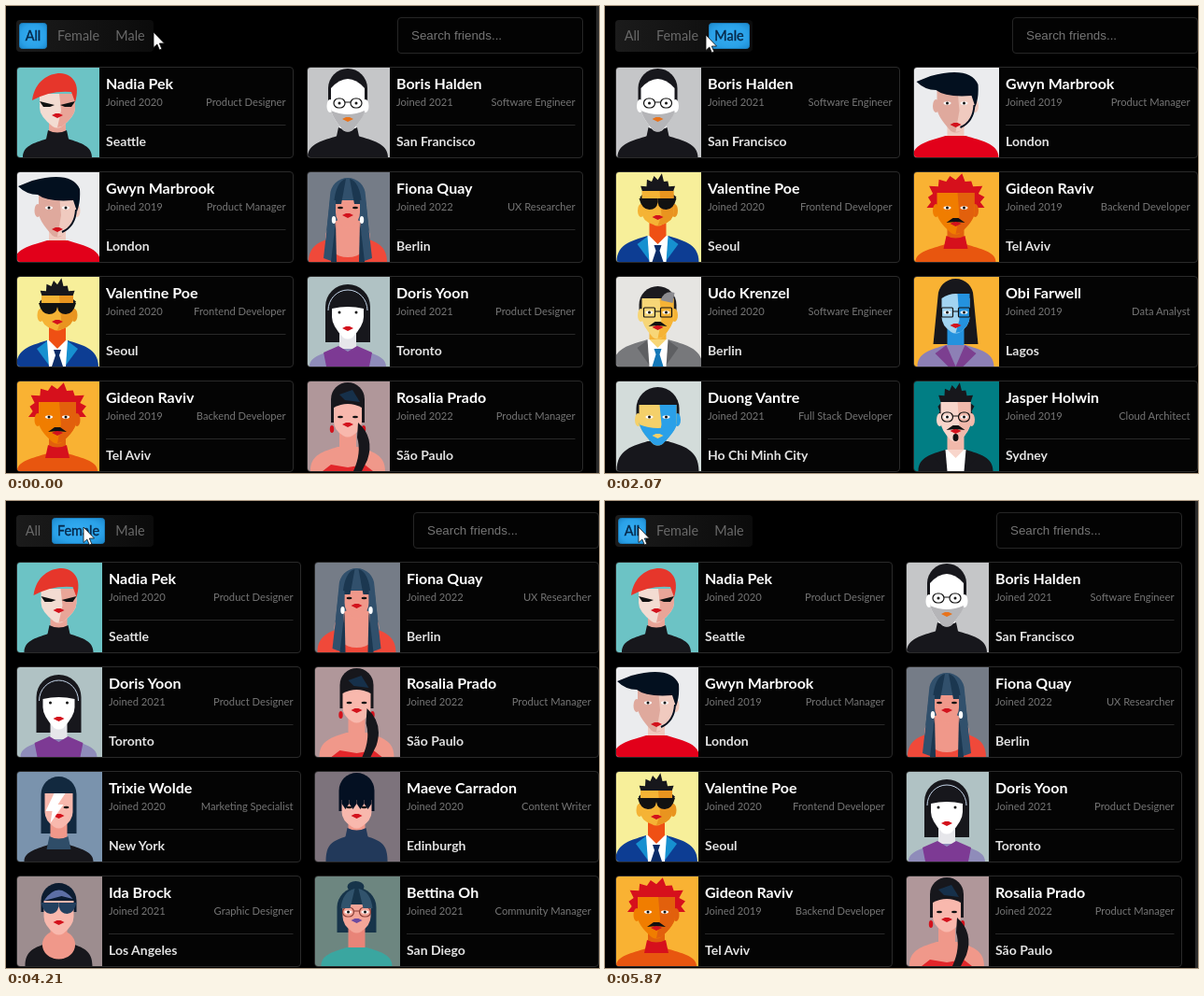
These frames come from a looping animation (635x500 px, 7100 ms). An HTML page:

```html
<!DOCTYPE html>
<html lang="en">
<head>
<meta charset="utf-8">
<title>Friends</title>
<style>
html, body { margin: 0; width: 100%; height: 100%; overflow: hidden; background: #000; }
svg { display: block; }
text { font-family: Lato, sans-serif; fill: #757575; font-size: 11.2px; }
.name { font-size: 16px; font-weight: 700; fill: #fff; }
.city { font-size: 14px; font-weight: 700; fill: #e2e2e2; }
.hint { font: 13.33px "Liberation Sans", Arial, sans-serif; }
.end { text-anchor: end; }
.tab text { font-size: 14.4px; text-anchor: middle; fill: #696969; }
.tab rect { fill: none; }
.hot text { fill: #fff; }
.hot rect { fill: #0c0c0c; }
.on rect { fill: url(#blue); stroke: #1b7fbe; }
.on text { fill: #06284a; stroke: #06284a; stroke-width: .4px; }
</style>
</head>
<body>
<script>
const ink = '#17171c', navy = '#0d2238', red = '#d3121c', pink = '#f8b8ad', rose = '#f0988a';

// name, joined, role, city, group, look
const people = [
  ['Nadia Pek', 2020, 'Product Designer', 'Seattle', 'Female', { bg: '#6cc3c5', skin: '#f3dcd2', shade: '#e9a598', w: 19, top: 28, chin: 63,
    eyes: 'slant', coat: ink, shoulder: 76, broad: 37, collar: ink,
    front: fill('#e6362b', 'M20 35C23 14 38 6 50 6C64 7 72 18 66 37L62 26Q40 24 20 35Z') }],
  ['Boris Halden', 2021, 'Software Engineer', 'San Francisco', 'Male', { bg: '#c5c6c8', skin: '#fff', w: 18, top: 12, arc: 10, chin: 67,
    hair: ink, crown: 1, stubble: '#b5b5b8', eyes: 'specs', lips: '#e8731c', coat: ink, collar: ink, broad: 43 }],
  ['Gwyn Marbrook', 2019, 'Product Manager', 'London', 'Male', { bg: '#ebecee', skin: '#dfa99d', shade: '#f0cabf', w: 20, top: 24, chin: 68,
    eyes: 'open', mouth: 61, coat: '#e2001a', broad: 46,
    front: fill('#03101f', 'M5 15L20 9Q62 -2 71 18Q72 32 68 42L64 30Q36 32 26 24Q14 24 5 15Z') + line('#03101f', 'M67 40Q66 58 52 64', 2) }],
  ['Fiona Quay', 2022, 'UX Researcher', 'Berlin', 'Female', { bg: '#757c87', skin: rose, w: 13, top: 30, chin: 58,
    hair: '#31506c', r: 19, crown: 6, end: 96, flare: 7, eyes: 'shut', coat: '#f0493a', broad: 42, shoulder: 68, neckline: 30,
    strands: '#1b3750', drops: '#fff' }],
  ['Valentine Poe', 2020, 'Frontend Developer', 'Seoul', 'Male', { bg: '#f7ef9a', skin: '#f5b335', shade: '#e9941f', throat: '#ef5014', w: 17, top: 20, chin: 56,
    spikes: 20, eyes: 'shades', mouth: 48, coat: '#0d3d93', broad: 44, shoulder: 68, lapel: '#1690d0', tie: '#0b2c68' }],
  ['Doris Yoon', 2021, 'Product Designer', 'Toronto', 'Female', { bg: '#b0c2c4', skin: '#fff', throat: '#e6e6ea', w: 17, top: 32, arc: 2, chin: 65,
    hair: ink, r: 24, crown: 8, end: 70, eyes: 'open', mouth: 55, coat: '#8f8cba', broad: 41, shoulder: 77, bib: '#7d3a94', band: '#c4d4e8' }],
  ['Gideon Raviv', 2019, 'Backend Developer', 'Tel Aviv', 'Male', { bg: '#f9b233', skin: '#f07d00', shade: '#e2600c', w: 20, top: 22, chin: 65,
    hair: '#d6101c', spikes: 31, eyes: 'open', mouth: 55, whiskers: 1, coat: '#e8560f', broad: 43, shoulder: 77, collar: '#d6101c' }],
  ['Rosalia Prado', 2022, 'Product Manager', 'São Paulo', 'Female', { bg: '#b0979a', skin: pink, throat: rose, w: 15, top: 24, arc: 4, chin: 58,
    hair: ink, crown: 1, end: 44, eyes: 'shut', coat: rose, broad: 40, shoulder: 70, drops: red, dress: '#e2262a',
    front: fill(ink, 'M58 44Q76 60 68 84L62 96H53Q62 76 57 60Z') + fill('#16304a', 'M38 14L52 9L60 22L44 20Z') }],
  ['Udo Krenzel', 2020, 'Software Engineer', 'Berlin', 'Male', { bg: '#e6e5e2', skin: '#f7d677', shade: '#f5b335', w: 17, top: 23, chin: 65,
    hair: '#1b1b1f', crown: 10, eyes: 'specs', square: 1, mouth: 54, whiskers: 1, coat: '#77787b', broad: 48, shoulder: 67, lapel: '#5e5f62', tie: '#1478b8',
    front: fill('#8c8c90', 'M50 25Q54 14 65 17L63 28Z') }],
  ['Obi Farwell', 2019, 'Data Analyst', 'Lagos', 'Male', { bg: '#f9b233', skin: '#a2d4f1', shade: '#2492de', w: 15, top: 18, arc: 5, chin: 59,
    hair: ink, r: 19, crown: 2, end: 72, flare: 5, eyes: 'specs', square: 1, mouth: 52, coat: '#8d80b5', broad: 41, lapel: '#7c3f90' }],
  ['Duong Vantre', 2021, 'Full Stack Developer', 'Ho Chi Minh City', 'Male', { bg: '#d3dcda', skin: '#f4d06a', shade: '#2aa0e8', throat: '#1d86d0', w: 20, top: 25, chin: 67,
    hair: ink, r: 23, crown: 6, eyes: 'open', lips: '#f4d06a', stubble: '#2aa0e8', mouth: 58, coat: ink, broad: 44, shoulder: 64 }],
  ['Jasper Holwin', 2019, 'Cloud Architect', 'Sydney', 'Male', { bg: '#017e84', skin: '#f8d5cb', shade: '#f1b9ab', w: 16, top: 22, chin: 63,
    spikes: 20, eyes: 'specs', mouth: 53, whiskers: 1, goatee: 1, coat: ink, broad: 40, lapel: ink, tie: '#fff' }],
  ['Trixie Wolde', 2020, 'Marketing Specialist', 'New York', 'Female', { bg: '#7a93ad', skin: pink, throat: rose, w: 15, top: 23, chin: 59,
    hair: '#12293f', r: 19, crown: 5, end: 66, eyes: 'shut', coat: ink, broad: 37, shoulder: 78, collar: '#2f4d68',
    front: fill('#fff', 'M42 23H54L46 35H52L38 55L40 42H33Z') }],
  ['Maeve Carradon', 2020, 'Content Writer', 'Edinburgh', 'Female', { bg: '#7d737c', skin: pink, throat: rose, w: 16, top: 30, chin: 59,
    hair: '#041022', crown: 1, end: 42, eyes: 'shut', coat: '#22395a', broad: 33, shoulder: 69, collar: '#22395a', fringe: 38 }],
  ['Ida Brock', 2021, 'Graphic Designer', 'Los Angeles', 'Female', { bg: '#9d8d8f', skin: pink, throat: rose, w: 16, top: 26, chin: 61,
    hair: '#0b1c30', crown: 7, eyes: 'shades', lens: '#23405f', coat: ink, broad: 36, shoulder: 71, neckline: 22,
    front: fill('#5c6fa5', 'M31 26Q46 4 62 24L50 21Z') }],
  ['Bettina Oh', 2021, 'Community Manager', 'San Diego', 'Female', { bg: '#6d8680', skin: '#f3a598', throat: '#e88478', w: 15, top: 30, chin: 59,
    hair: '#17344a', r: 21, crown: 12, end: 60, bun: 1, eyes: 'specs', frame: '#8d4038', lips: '#6b4aa0', coat: '#3aa6a0', broad: 38, shoulder: 76, strands: '#31536c' }]
];

const C = 47; // centre line of every portrait
function fill(color, d) { return `<path d="${d}" fill="${color}"/>`; }
function line(color, d, width = 1.2) { return `<path d="${d}" fill="none" stroke="${color}" stroke-width="${width}"/>`; }
function oval(color, x, y, rx, ry = rx) { return `<ellipse cx="${x}" cy="${y}" rx="${rx}" ry="${ry}" fill="${color}"/>`; }
function pair(part) { return part(-1) + part(1); }

function arch(color, r, crown, end, flare = 0) {
  return fill(color, `M${C - r - flare} ${end}L${C - r} ${crown + r}A${r} ${r} 0 0 1 ${C + r} ${crown + r}L${C + r + flare} ${end}Z`);
}

function spikes(color, rx) {
  let d = `M${C - rx} 38`;
  for (let i = 0; i <= 16; i++) {
    const a = Math.PI * (1 + i / 16), k = i % 2 ? 1.05 + .08 * Math.sin(i * 5) : .85;
    d += `L${C + rx * k * Math.cos(a)} ${32 + 28 * k * Math.sin(a)}`;
  }
  return fill(color, d + `L${C + rx} 38Z`);
}

function head({ skin, shade, w, top, arc = 0, chin, stubble }) {
  const jaw = s => `Q${C + s * w} 52 ${C + s * 5} ${chin}`;
  const chinCurve = `Q${C} ${chin + 3} ${C - 5} ${chin}Q${C - w} 52 ${C - w} 43`;
  let out = fill(skin, `M${C - w} ${top + arc}Q${C} ${top - arc} ${C + w} ${top + arc}V43${jaw(1)}${chinCurve}Z`);
  if (shade) out += fill(shade, `M${C + 2} ${top}H${C + w}V43${jaw(1)}L${C} ${chin + 1}L${C + 4} 46Z`);
  if (stubble) out += fill(stubble, `M${C - w} 46Q${C} 54 ${C + w} 46${jaw(1)}${chinCurve}Z`);
  return out;
}

function eyes({ eyes: kind, w, square, frame = '#111', lens = '#111' }) {
  if (kind === 'slant') return pair(s => fill('#111', `M${C + s * 3} 40L${C + s * 19} 36L${C + s * 15} 42H${C + s * 8}Z`));
  if (kind === 'shut') return pair(s => oval('#111', C + s * 8, 38, 3, 1.2));
  if (kind === 'shades') return pair(s => fill(lens, `M${C} 28H${C + s * (w + 3)}Q${C + s * w} 40 ${C + s * 9} 40T${C} 32Z`));
  let out = pair(s => oval('#fff', C + s * 9, 38, 4, 1.8) + oval('#111', C + s * 9, 38, 1.5));
  if (kind === 'specs') out += pair(s => `<rect x="${C + s * 9 - 6}" y="33" width="12" height="10" rx="${square ? 1 : 5}" fill="none" stroke="${frame}" stroke-width="1.2"/>`)
    + line(frame, `M${C - 3} 37h6`);
  return out;
}

function mouth({ lips = red, chin, mouth: y = chin - 12, whiskers, goatee }) {
  let out = fill(lips, `M${C - 6} ${y}L${C - 2} ${y - 2}H${C + 2}L${C + 6} ${y}L${C} ${y + 3}Z`);
  if (whiskers) out += fill('#111', `M${C - 10} ${y - 1}L${C - 3} ${y - 6}H${C + 3}L${C + 10} ${y - 1}L${C} ${y - 2}Z`);
  if (goatee) out += oval('#111', C, y + 7, 3, 4);
  return out;
}

function body({ coat, broad, shoulder: y = 73, collar, lapel, tie, bib, dress, neckline, skin, throat = skin }) {
  const side = (s, x) => `C${C + s * broad} ${y + 8} ${C + s * 26} ${y + 5} ${x} ${y}`;
  let out = fill(coat, `M${C - broad} 96${side(-1, C - 11)}H${C + 11}C${C + 26} ${y + 5} ${C + broad} ${y + 8} ${C + broad} 96Z`);
  if (lapel) out += pair(s => fill(lapel, `M${C + s * 10} ${y}L${C + s * 22} ${y + 9}L${C + s * 8} 96H${C}Z`));
  if (tie) out += fill('#fff', `M${C - 11} ${y}H${C + 11}L${C + 9} 96H${C - 9}Z`) + fill(throat, `M${C - 9} ${y}h18l-9 9z`)
    + fill(tie, `M${C - 4} ${y + 10}h8l-2 6l4 ${80 - y}h-12l4 ${y - 80}z`);
  if (bib) out += fill(bib, `M${C - 23} 96L${C - 26} ${y + 4}L${C - 10} ${y - 3}L${C} ${y + 3}L${C + 10} ${y - 3}L${C + 26} ${y + 4}L${C + 23} 96Z`);
  if (dress) out += fill(dress, `M${C - 27} 96L${C - 18} 89L${C} 92L${C + 18} 89L${C + 27} 96Z`);
  if (neckline) out += oval(throat, C, y + 2, neckline * .8, neckline * .7);
  if (collar) out += fill(collar, `M${C - 10} ${y - 9}Q${C} ${y - 4} ${C + 10} ${y - 9}L${C + 13} ${y + 5}H${C - 13}Z`);
  return out;
}

function portrait(look, group) {
  const { bg, skin, shade = skin, throat = shade, hair = ink, w, top, crown, r = w + 3, end = 38, flare, chin } = look;
  const { bun, strands, band, drops, fringe, front = '' } = look;
  let out = `<rect width="96" height="96" fill="${bg}"/>`;
  if (bun) out += oval(hair, C - 1, 11, 9, 6);
  if (crown) out += arch(hair, r, crown, end, flare);
  if (look.spikes) out += spikes(hair, look.spikes);
  out += fill(throat, `M${C - 9} 48h18v34h-18z`) + body(look);
  if (group === 'Male' && end < 40) out += pair(s => oval(s < 0 ? skin : shade, C + s * (w + 1), 41, 3.5, 7));
  out += head(look) + eyes(look) + mouth(look);
  if (strands) out += pair(s => fill(strands, `M${C + s * 2} ${crown + 1}Q${C + s * w} ${crown + 4} ${C + s * (w + 2)} 34H${C + s * 7}Z`));
  if (strands && end > 90) out += pair(s => fill(hair, `M${C + s * w} 30H${C + s * r}L${C + s * 26} 92L${C + s * 15} 96Z`) + fill(strands, `M${C + s * w} 52L${C + s * 18} 96H${C + s * 12}Z`));
  if (band) out += line(band, `M${C - 21} 36A21 22 0 0 1 ${C + 21} 36`, 1);
  if (drops) out += pair(s => oval(drops, C + s * (w + 2), 51, 2.2, 4));
  if (fringe) for (let x = C - w; x < C + w; x += 8) out += fill(hair, `M${x} 29h8v5l-4 ${fringe - 32}l-4 -6z`);
  return out + front;
}

const tabs = [['All', 14, 30], ['Female', 49, 57], ['Male', 111, 44]];
const loop = 7100;
// start, end, from x, to x, dip
const moves = [[280, 740, 158, 138, 4], [1830, 2630, 138, 85, 4], [4190, 4830, 85, 57, 1], [4930, 5510, 57, 36, 5]];

function card([name, year, role, city, group, look], x, y, w, pic) {
  const left = pic + 8, right = w - 8.5;
  return `<g transform="translate(${x} ${y})">
    <rect x=".5" y=".5" width="${w - 1}" height="97" rx="3.5" fill="#040404" stroke="#2a2a2a"/>
    <g clip-path="url(#round)"><svg x="1" y="1" width="${pic}" height="96" viewBox="0 0 96 96" preserveAspectRatio="xMidYMid slice">${portrait(look, group)}</svg></g>
    <text class="name" x="${left}" y="24">${name}</text>
    <text x="${left}" y="42">Joined ${year}</text>
    <text class="end" x="${right}" y="42">${role}</text>
    <path d="M${left} 62.5H${right}" stroke="#292929"/>
    <text class="city" x="${left}" y="85">${city}</text></g>`;
}

function view(group) {
  const all = group === 'All';
  const [x2, right, pic] = all ? [322, 618, 88] : [330, 635, 91];
  const shown = people.filter(p => all || p[4] === group).slice(0, 8);
  const cards = shown.map((p, i) => card(p, i % 2 ? x2 : 11, 65 + 112 * (i >> 1), i % 2 ? right - x2 : x2 - 25, pic));
  return `<g class="view">
    <rect x="${right - 198.5}" y="12.5" width="198" height="38" rx="3.5" fill="#030303" stroke="#262626"/>
    <text class="hint" x="${right - 184}" y="36">Search friends...</text>
    ${all ? '<path d="M632 0h3v500h-3z" fill="#2b2b2b"/>' : ''}${cards.join('')}</g>`;
}

document.body.innerHTML = `<svg width="635" height="500">
  <defs>
    <clipPath id="round"><rect x="1" y="1" width="120" height="96" rx="3"/></clipPath>
    <linearGradient id="bar"><stop stop-color="#1b1b1b"/><stop offset="1" stop-color="#0b0b0b"/></linearGradient>
    <radialGradient id="blue" r=".75"><stop stop-color="#35aef4"/><stop offset=".6" stop-color="#2aa1e8"/><stop offset="1" stop-color="#1a84c8"/></radialGradient>
  </defs>
  ${tabs.map(t => view(t[0])).join('')}
  <rect x="11" y="15" width="147" height="34" rx="4" fill="url(#bar)"/>
  ${tabs.map(([label, x, w]) => `<g class="tab"><rect x="${x + .5}" y="18.5" width="${w - 1}" height="27" rx="3"/>
    <text x="${x + w / 2}" y="37">${label}</text></g>`).join('')}
  <path id="arrow" d="M0 0V16.5L3.8 13 6.4 19 8.8 18 6.3 12H11.5Z" fill="#fff" stroke="#111" stroke-width=".8"/>
</svg>`;

const views = document.querySelectorAll('.view');
const buttons = document.querySelectorAll('.tab');
const arrow = document.getElementById('arrow');

function pointer(t) {
  const [start, end, from, to, dip] = moves.findLast(m => t >= m[0]) || moves[0];
  const k = Math.min(1, Math.max(0, (t - start) / (end - start)));
  const eased = 1 - (1 - k) ** 2.3;
  return [from + (to - from) * eased, 28 + dip * Math.sin(Math.PI * k)].map(Math.round);
}

function draw(now) {
  const t = now % loop;
  const active = t < 1240 || t >= 5870 ? 0 : t < 3250 ? 2 : 1;
  const [x, y] = pointer(t);
  arrow.setAttribute('transform', `translate(${x} ${y})`);
  tabs.forEach(([, left, w], i) => {
    const hot = x >= left && x < left + w;
    views[i].style.display = i === active ? '' : 'none';
    buttons[i].setAttribute('class', 'tab' + (i === active ? ' on' : hot ? ' hot' : ''));
  });
}

const begin = performance.now();
function tick() {
  draw(performance.now() - begin);
  requestAnimationFrame(tick);
}
tick();
</script>
</body>
</html>
```
